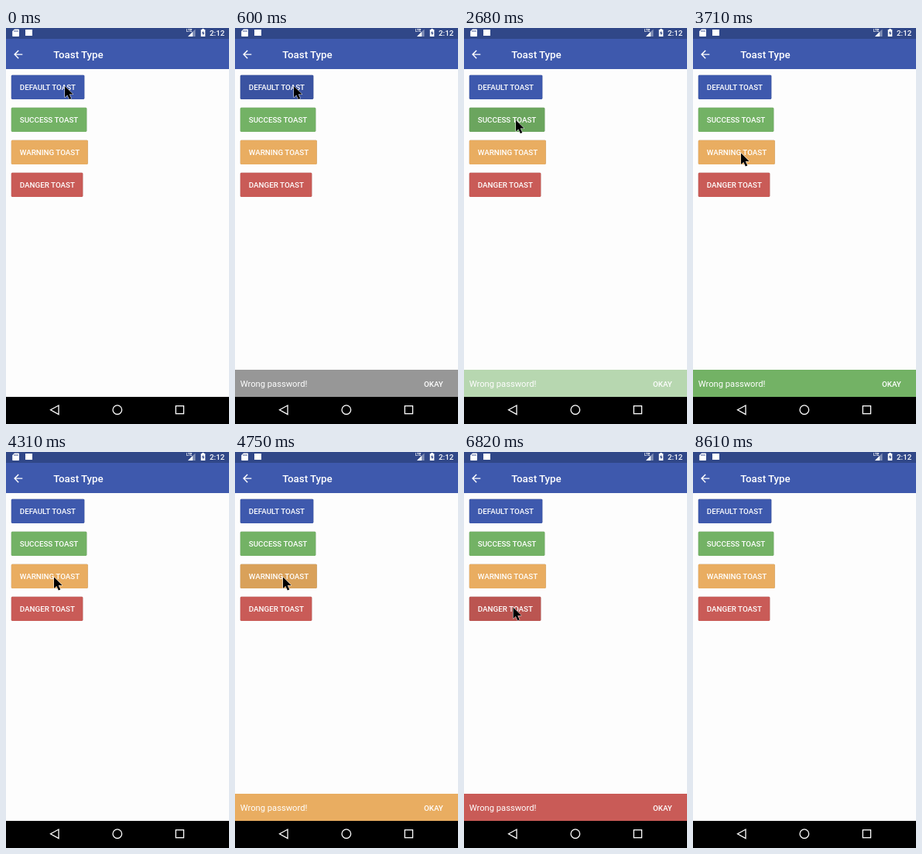
An HTML page for the animation above (8760 ms loop, 288 px wide and 511 px high).

```html
<!DOCTYPE html>
<html lang="en">
<head>
<meta charset="utf-8">
<title>Toast Type</title>
<style>
html, body { margin: 0; width: 100%; height: 100%; overflow: hidden; background: #fdfdfd; }
svg { display: block; width: 288px; height: 511px; font-family: Roboto, sans-serif; }
text { fill: #fff; }
.label { font-size: 9.8px; font-weight: 500; }
.raised { filter: drop-shadow(0 .7px .7px #0005); }
.line { fill: none; stroke: #fff; stroke-width: 1.3; }
</style>
</head>
<body>
<svg viewBox="0 0 288 511">
  <rect width="288" height="511" fill="#fdfdfd"/>
  <rect class="raised" y="13" width="288" height="40" fill="#3e59ad"/>
  <rect width="288" height="14" fill="#304788"/>

  <g fill="#fff">
    <path d="M11 1.5h5.2q.8 0 .8.8v7.9q0 .8-.8.8H9q-.8 0-.8-.8V4.3z"/>
    <path d="M11 3v2M13 3v2M15 3v2" stroke="#304788" stroke-width=".9"/>
    <rect x="25" y="2" width="9" height="8"/>
    <path d="M244.5 1.5V11H235z" opacity=".4"/>
    <path d="M241 5V11H235z"/>
    <text x="233" y="5.2" font-size="4.5" font-weight="700">LTE</text>
    <path d="M253.3 1h2.4v1.1h1.6V11h-5.6V2.1h1.6z"/>
    <path d="M255 3.4l-2.1 3.7h1.4v2.7l2-3.8h-1.3z" fill="#304788"/>
    <text class="label" x="263" y="9.7">2:12</text>
    <path transform="translate(7.3 25.7) scale(.7)" d="M20 11H7.83l5.59-5.59L12 4l-8 8 8 8 1.41-1.41L7.83 13H20z"/>
  </g>
  <text x="61.3" y="39" font-size="13.3" font-weight="500">Toast Type</text>

  <g id="buttons"></g>

  <g id="toast">
    <rect id="bar" y="441" width="288" height="35"/>
    <text x="6.7" y="463" font-size="11.2">Wrong password!</text>
    <text class="label" x="244" y="462.5">OKAY</text>
  </g>

  <rect y="476" width="288" height="35"/>
  <path class="line" d="M57.5 492.7L68 487v11.6z"/>
  <circle class="line" cx="143.8" cy="492.7" r="5.8"/>
  <rect class="line" x="219.3" y="487.7" width="10.2" height="10"/>

  <path id="cursor" d="M0 0V14.5L3.3 11.4L5.8 17L8.3 15.9L5.8 10.4H10.6Z" stroke="#fff" stroke-width="1" paint-order="stroke"/>
</svg>
<script>
const LOOP = 8760, TICK = 148.4;
const $ = id => document.getElementById(id);

// start: tick of the tap; hide: tick at which the toast is gone
const kinds = [
  { name: 'DEFAULT', width: 94.5, color: '#3e59ad', bar: '#333', start: 4, hide: 15 },
  { name: 'SUCCESS', width: 97.5, color: '#73b265', start: 18, hide: 29 },
  { name: 'WARNING', width: 99, color: '#e9ad61', start: 31, hide: 42 },
  { name: 'DANGER', width: 92.5, color: '#c95b57', start: 45, hide: 55 }
];

// tick, x, y
const path = [
  [0, 76, 75], [11, 76, 75], [12, 76, 77], [15, 67, 114], [17, 67, 114],
  [18, 67, 119], [22, 67, 119], [25, 62, 161.5], [36, 62, 161.5],
  [40, 63.5, 200.5], [47, 63.5, 200.5], [52, 248.5, 457.5],
  [56, 248.5, 457.5], [57, 256, 487], [58, 262, 530]
];

$('buttons').innerHTML = kinds.map((k, i) => {
  const y = 60.7 + 42 * i;
  const box = `x="6.8" y="${y}" width="${k.width}" height="31.3" rx="1.4"`;
  return `<rect class="raised" ${box} fill="${k.color}"/>
    <rect class="shade" ${box} opacity="0"/>
    <text class="label" x="17.8" y="${y + 19.4}">${k.name} TOAST</text>`;
}).join('');
const shades = document.querySelectorAll('.shade');

function cursorAt(n) {
  const i = path.findIndex(p => p[0] >= n);
  if (i < 0) return path.at(-1).slice(1);
  if (i === 0) return path[0].slice(1);
  const [t0, x0, y0] = path[i - 1], [t1, x1, y1] = path[i];
  const u = (n - t0) / (t1 - t0), e = u * u * (3 - 2 * u);
  return [x0 + (x1 - x0) * e, y0 + (y1 - y0) * e];
}

function draw(now) {
  const n = Math.floor((now % LOOP + 9) / TICK);
  const shown = kinds.find(k => n >= k.start && n < k.hide);
  let alpha = 0;
  if (shown) {
    alpha = n === shown.start || n === shown.start + 10 ? .5 : 1;
    $('bar').setAttribute('fill', shown.bar || shown.color);
  }
  $('toast').setAttribute('opacity', alpha);
  kinds.forEach((k, i) => {
    const pressed = n >= k.start && n < k.start + 3;
    shades[i].setAttribute('opacity', pressed ? .07 : 0);
  });
  $('cursor').setAttribute('transform', `translate(${cursorAt(n)})`);
}

let begin;
function frame(now) {
  begin ??= now;
  draw(now - begin);
  requestAnimationFrame(frame);
}
draw(0);
requestAnimationFrame(frame);
</script>
</body>
</html>
```
